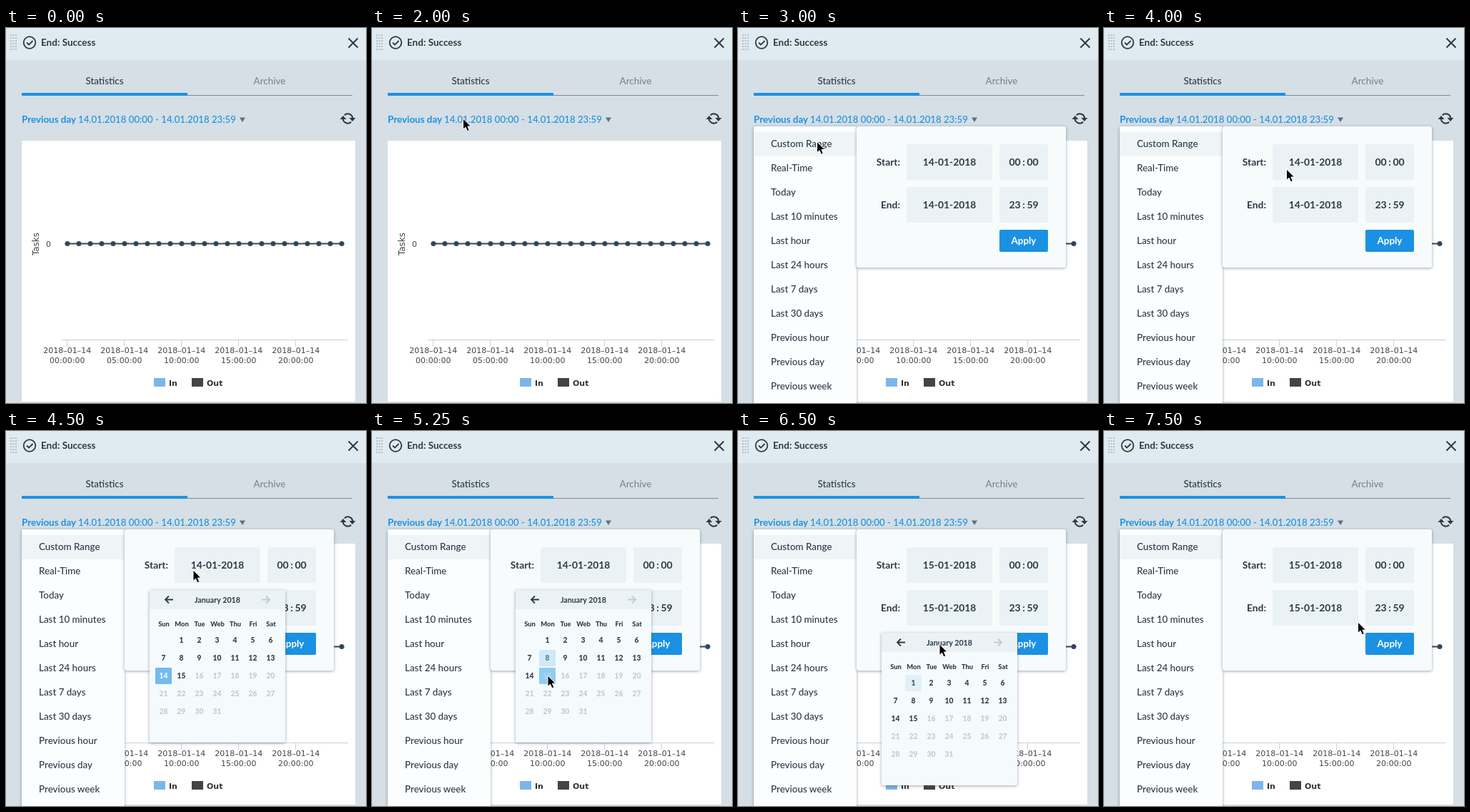
Recreate the animation shown at these times as an HTML page. Size 504 px wide and 526 px high, loop 8000 ms.

```html
<!DOCTYPE html>
<html lang="en">
<head>
<meta charset="utf-8">
<title>Statistics range picker</title>
<style>
  html, body { margin: 0; width: 100%; height: 100%; overflow: hidden; background: #d5dfe5; }
  svg { display: block; width: 504px; height: 526px; }
  text { font: 500 13.4px Lato, sans-serif; fill: #2d3a45; white-space: pre; }
  .b { font-weight: 700; }
  .mid { text-anchor: middle; }
  .end { text-anchor: end; }
  .chart text { font: 11px "DejaVu Sans", sans-serif; fill: #444; }
  .chart .b { font-weight: 700; fill: #333; }
  .cal text { font-size: 10.3px; font-weight: 800; }
  .cal .head { font-size: 10.7px; font-weight: 700; }
  .cal .week { font-size: 9.4px; }
  .menu { filter: drop-shadow(0 1px 2px rgba(40, 60, 75, .45)); }
</style>
</head>
<body>
<svg id="stage" viewBox="0 0 504 526"></svg>
<script>
const LOOP = 8000;
const INK = '#2d3a45', BLUE = '#1b91e3', PALE = '#c1cad0';
const stage = document.getElementById('stage');

function add(parent, tag, attrs = {}, content) {
  const el = document.createElementNS('http://www.w3.org/2000/svg', tag);
  for (const k in attrs) el.setAttribute(k, attrs[k]);
  if (content !== undefined) el.textContent = content;
  parent.appendChild(el);
  return el;
}
const group = (parent, cls) => add(parent, 'g', { class: cls });
const rect = (p, x, y, width, height, fill, rx = 0) =>
  add(p, 'rect', { x, y, width, height, fill, rx });
const text = (p, x, y, s, cls = '', style = '') => add(p, 'text', { x, y, class: cls, style }, s);
const stroke = (p, d, color, width) =>
  add(p, 'path', { d, fill: 'none', stroke: color, 'stroke-width': width });
const show = (el, on) => el.setAttribute('visibility', on ? 'visible' : 'hidden');

function drawHeader() {
  const g = group(stage, 'header');
  rect(g, 0, 0, 504, 526, '#d5dfe5');
  rect(g, 0, 0, 504, 45, '#dfebf0');
  for (let r = 0; r < 6; r++)
    for (let c = 0; c < 3; c++) rect(g, 6 + c * 3.5, 9 + r * 4, 2, 2, '#b4bfc6');
  add(g, 'circle', { cx: 33, cy: 20.5, r: 8.3, fill: 'none', stroke: INK, 'stroke-width': 1.8 });
  stroke(g, 'M29 20.5l3 3 5.5-5.5', INK, 1.8);
  text(g, 49, 25, 'End: Success', 'b', 'font-size:13.5px');
  stroke(g, 'M479.5 14.5l13 13m0-13l-13 13', INK, 2);

  text(g, 138, 79, 'Statistics', 'mid');
  text(g, 369, 79, 'Archive', 'mid', 'fill:#7b8790');
  rect(g, 254, 94, 231, 1, '#7f8c96');
  rect(g, 22, 91, 232, 4, BLUE);

  text(g, 22, 133, 'Previous day', 'b', 'fill:' + BLUE);
  text(g, 101, 133, '14.01.2018 00:00 - 14.01.2018 23:59', '', 'font-size:13.2px;fill:' + BLUE);
  add(g, 'path', { d: 'M327 125.5h8l-4 6.5z', fill: '#5d7183' });

  stroke(g, 'M473.8 122.3A6.7 6.7 0 0 1 485.2 126.5M483.2 131.7A6.7 6.7 0 0 1 471.8 127.5', INK, 2.1);
  add(g, 'path', { d: 'M480.5 126h9l-4.5 5zM467.5 128h9l-4.5-5z', fill: INK });
}

function drawChart() {
  const g = group(stage, 'chart');
  rect(g, 22, 158, 467, 366, '#fff');
  text(g, 0, 0, 'Tasks', 'mid', 'font-size:12px').setAttribute('transform', 'translate(46 303) rotate(-90)');
  text(g, 56, 307, '0');
  rect(g, 78, 437, 401, 1, '#c3d2e0');
  for (let i = 0; i < 5; i++) {
    const x = 85 + i * 80;
    rect(g, x, 437, 1, 10, '#c3d2e0');
    text(g, x + 0.7, 456, '2018–01–14', 'mid');
    text(g, x + 0.7, 470, `${String(i * 5).padStart(2, '0')}:00:00`, 'mid');
  }
  rect(g, 86, 301.5, 384, 2, '#434348');
  for (let x = 86; x <= 470; x += 16) {
    add(g, 'circle', { cx: x, cy: 302.5, r: 3.6, fill: '#385a80' });
    add(g, 'path', { d: `M${x} 299l3.5 3.5-3.5 3.5-3.5-3.5z`, fill: '#344252' });
  }
  rect(g, 207, 491, 16, 12, '#7cb5ec');
  text(g, 228, 502, 'In', 'b');
  rect(g, 260, 491, 16, 12, '#434348');
  text(g, 281, 502, 'Out', 'b');
}

function drawMenu() {
  const g = group(stage, 'menu');
  rect(g, 22, 138, 144, 400, '#fcfdfe', 2);
  const hover = rect(g, 22, 146, 144, 34, '#eff4f7');
  ['Custom Range', 'Real-Time', 'Today', 'Last 10 minutes', 'Last hour', 'Last 24 hours', 'Last 7 days',
    'Last 30 days', 'Previous hour', 'Previous day', 'Previous week']
    .forEach((s, i) => text(g, 46, 167 + i * 34, s));
  return { g, hover };
}

function drawPanel() {
  const g = group(stage, 'menu');
  rect(g, 166, 138, 293, 198, '#f8fbfc', 3);
  const dates = ['Start:', 'End:'].map((label, i) => {
    const y = 163 + i * 60;
    text(g, 227, y + 30, label, 'b end', 'font-size:13.8px');
    rect(g, 236, y, 120, 50, '#ebf2f6', 2);
    rect(g, 366, y, 68, 50, '#ebf2f6', 2);
    [i ? '23' : '00', ':', i ? '59' : '00'].forEach((s, k) =>
      text(g, [387.5, 400, 412.5][k], y + 30, s, 'b mid', 'font-size:14px'));
    return text(g, 296, y + 30, '', 'b mid', 'font-size:13.8px');
  });
  rect(g, 366, 283, 68, 31, BLUE, 2);
  text(g, 400, 303, 'Apply', 'b mid', 'fill:#fff');
  return { g, dates };
}

function drawCalendar() {
  const g = group(stage, 'cal menu');
  rect(g, 201, 223, 190, 214, '#f5fafd', 2);
  rect(g, 201, 223, 190, 27, '#eaf2f6', 2);
  stroke(g, 'M234 236.5h-11m5-5l-5 5 5 5', INK, 1.8);
  stroke(g, 'M358 236.5h11m-5-5l5 5-5 5', PALE, 1.8);
  text(g, 296, 240.5, 'January 2018', 'mid head');
  ['Sun', 'Mon', 'Tue', 'Web', 'Thu', 'Fri', 'Sat'].forEach((s, i) =>
    text(g, 221 + i * 25, 274, s, 'mid week'));
  const cells = [];
  for (let d = 1; d <= 31; d++) {
    const x = 209 + (d % 7) * 25, y = 282 + Math.floor(d / 7) * 25;
    cells[d] = { box: rect(g, x, y, 23, 23, 'none', 1), label: text(g, x + 11.5, y + 15.3, d, 'mid') };
  }
  return { g, cells };
}

function drawCursor() {
  return add(stage, 'path', {
    d: 'M0 0V15.4L3.5 12.2 6 17.8 8.8 16.6 6.4 11H11Z',
    fill: '#000', stroke: '#fff', 'stroke-width': 1
  });
}

drawHeader();
drawChart();
const menu = drawMenu();
const panel = drawPanel();
const cal = drawCalendar();
const cursor = drawCursor();

// [time, x, y]
const moves = [
  [1000, 119, 38], [1250, 125.5, 113.5], [1500, 128.5, 124.5], [2000, 127.5, 127], [2500, 126, 129],
  [2750, 110.5, 159.5], [3500, 119, 160], [3750, 231.5, 203.5], [4000, 255.5, 198], [4250, 262, 195],
  [4750, 252.5, 273.5], [5000, 265.5, 289.5], [5250, 246, 343], [6500, 282, 299],
  [6750, 334, 283], [7000, 355, 268], [7250, 355.5, 268]
];

const looks = {
  picked: ['#70bbf0', '#fff'],
  hover: ['#90ccf2', '#b9d9ea'],
  fading: ['#cfe9f9', '#5f7686'],
  faint: ['#e0f0f9', '#40505c']
};

// [time, {day: look}]
const marks = [
  [4500, { 14: 'picked' }], [5000, { 2: 'hover' }], [5250, { 8: 'fading', 15: 'hover' }],
  [5750, { 15: 'picked' }], [6000, { 1: 'hover' }], [6500, { 1: 'faint' }], [6750, {}]
];

const latest = (list, t) => list.filter(e => e[0] <= t).pop();
const within = (t, a, b) => t >= a && t < b;

function render(t) {
  show(menu.g, t >= 2250);
  show(menu.hover, t >= 2750);
  show(panel.g, t >= 3000);
  const date = t < 5500 ? '14-01-2018' : '15-01-2018';
  panel.dates.forEach(el => { el.textContent = date; });

  const second = within(t, 5750, 7500);
  show(cal.g, second || within(t, 4500, 5500));
  cal.g.setAttribute('transform', `translate(0 ${second ? 60 : 0})`);
  const mark = latest(marks, t);
  cal.cells.forEach((cell, d) => {
    const look = mark && looks[mark[1][d]];
    cell.box.setAttribute('fill', look ? look[0] : 'none');
    cell.label.style.fill = look ? look[1] : d > 15 ? PALE : INK;
  });

  const at = latest(moves, t);
  show(cursor, at);
  if (at) cursor.setAttribute('transform', `translate(${at[1]} ${at[2]})`);
}

function tick() {
  render(performance.now() % LOOP);
  requestAnimationFrame(tick);
}
tick();
</script>
</body>
</html>
```
